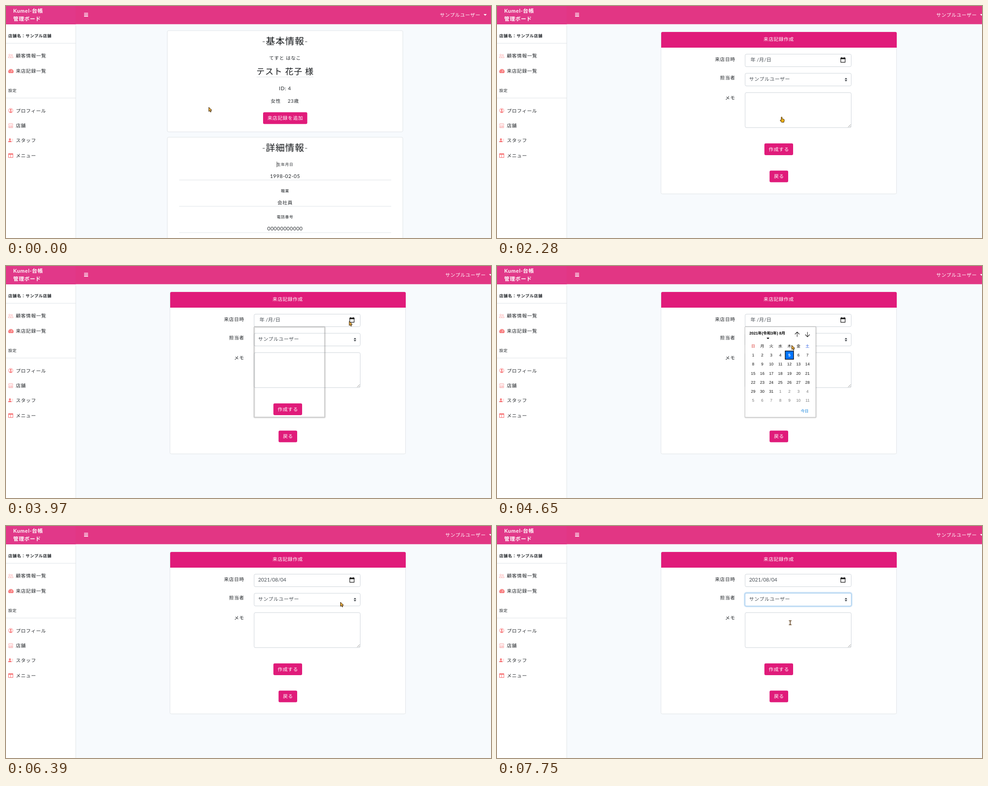
These frames come from a looping animation (1081 px wide and 518 px high, 8 s). An HTML page:

```html
<!DOCTYPE html>
<html lang="ja">
<head>
<meta charset="utf-8">
<title>来店記録</title>
<style>
html, body { margin: 0; width: 100%; height: 100%; overflow: hidden; background: #f7fafd; }
svg { display: block; width: 1081px; height: 518px; }
text { font-family: Lato, 'Noto Sans CJK JP', sans-serif; letter-spacing: .7px; white-space: pre; text-rendering: geometricPrecision; }
.cal text { font-family: 'Liberation Sans', 'Noto Sans CJK JP', sans-serif; letter-spacing: 0; }
.plain { letter-spacing: 0; }
.off { display: none; }
</style>
</head>
<body>
<svg id="stage" viewBox="0 0 1081 518" xmlns="http://www.w3.org/2000/svg"></svg>
<script>
const INK = '#212529', PINK = '#e01b7a', DARK = '#cb1269', CORAL = '#f8787a', LINE = '#dfe3e7', FIELD = '#ced4da';
const LOOP = 8000, STEP = 68;

const text = (s, x, y, { size = 10.6, fill = INK, anchor = 'start', weight = 400, cls = '' } = {}) =>
  `<text x="${x}" y="${y}" font-size="${size}" fill="${fill}" text-anchor="${anchor}" font-weight="${weight}" class="${cls}">${s}</text>`;
const mid = (s, x, y, o = {}) => text(s, x, y, { anchor: 'middle', ...o });
const rect = (x, y, w, h, fill, more = '') => `<rect x="${x}" y="${y}" width="${w}" height="${h}" fill="${fill}" ${more}/>`;
const box = (x, y, w, h, stroke, id = '') => rect(x, y, w, h, '#fff', `rx="3" stroke="${stroke}" ${id && `id="${id}"`}`);
const rule = (x, y, w) => rect(x, y, w, 1, LINE);
const path = (d, fill, stroke = 'none', w = 1) => `<path d="${d}" fill="${fill}" stroke="${stroke}" stroke-width="${w}"/>`;
const group = (id, body, cls = '') => `<g id="${id}" class="${cls}">${body}</g>`;
const button = (label, x, y, w, h, id = '') =>
  rect(x, y, w, h, PINK, `rx="3" ${id && `id="${id}"`}`) + mid(label, x + w / 2 + .3, y + h / 2 + 3.8, { fill: '#fff', size: 10.7 });

function topBar() {
  return rect(0, 0, 1081, 40.6, '#e23684') + rect(0, 0, 155, 41, '#e13889') +
    text('Kumel-台帳', 16, 14.5, { size: 11.7, weight: 700, fill: '#fff' }) +
    text('管理ボード', 16, 32.5, { size: 11.7, weight: 700, fill: '#fff' }) +
    [15.5, 18.8, 22.1].map(y => rect(174, y, 9, 1.6, '#fff', 'rx=".5"')).join('') +
    group('user', text('サンプルユーザー', 967, 23.8, { size: 10.7, fill: '#fff' }) + path('M1064.5 18h7l-3.5 3.8z', '#fff'));
}

function sideBar() {
  const items = [['顧客情報一覧', 115], ['来店記録一覧', 148.7], ['プロフィール', 237.5], ['店舗', 271], ['スタッフ', 304.3], ['メニュー', 337.8]];
  const icons =
    path('M5 115.5q0-3.5 3-3.5t3 3.5zM11 115.5h5q0-3.5-3-3.5-1 0-1.7.7M6.2 109.3a1.8 1.8 0 1 0 3.6 0a1.8 1.8 0 1 0-3.6 0M11.5 109.5a1.5 1.5 0 1 0 3 0a1.5 1.5 0 1 0-3 0', 'none', '#fbaeae', .9) +
    path('M6.2 149.8a5.8 5.8 0 1 1 9.6 0z', CORAL) +
    path('M11 147.5l2.4-4.4M7.5 146h1M8.4 142.9l.6.6M11 141.5v1M14 146h1', 'none', '#fff', 1) +
    `<circle cx="10.5" cy="233.4" r="4.9" fill="none" stroke="${CORAL}" stroke-width=".9"/><circle cx="10.5" cy="232" r="2" fill="${CORAL}"/>` +
    path('M7 236.6q3.5-3.6 7 0q-3.5 3-7 0z', CORAL) +
    path('M6 267v4.8h9v-4.8M5.4 265.2l1.2-2.8h7.8l1.2 2.8q-1.2 2.2-2.6 0q-1.2 2.2-2.5 0q-1.2 2.2-2.5 0q-1.2 2.2-2.6 0zM7.8 271.5v-3h2v3M11.5 268.3h2v1.8h-2z', 'none', '#fa9fa0', .9) +
    `<circle cx="8.7" cy="297.7" r="2.2" fill="${CORAL}"/>` + path('M4.8 304q0-3.6 3.9-3.6t3.9 3.6z', CORAL) +
    path('M12.8 297.5h3M12.8 300h3M13.8 302.5h2', 'none', '#fbaeae', .9) +
    rect(5, 329, 11, 10, CORAL, 'rx="1"') + rect(6.2, 332, 3.8, 5.8, '#fff') + rect(11, 332, 3.8, 5.8, '#fff');
  return rect(0, 40, 155, 478, '#fff') + rect(155, 40, 1, 478, LINE) +
    text('店舗名：サンプル店舗', 5, 70.3, { size: 9, weight: 700 }) + rule(0, 82.7, 155) +
    text('設定', 5, 192, { size: 8.8 }) + rule(0, 205, 155) +
    items.map(([s, y]) => text(s, 22, y)).join('') + icons;
}

function customerPage() {
  const c = 622, num = { size: 11.2 }, small = { size: 8.6 }, head = { size: 20.8, weight: 300, fill: '#15181b' };
  return box(359.5, 55, 525, 226, LINE) + box(359.5, 293, 525, 260, LINE) +
    mid('-基本情報-', c, 85.5, head) +
    mid('てすと はなこ', c, 120.3) + mid('テスト 花子 様', c, 152.5, { ...head, size: 18.7 }) + rule(558.5, 158, 127) +
    mid('ID: 4', c, 188, num) + text('女性', 590, 215.5) + text('23歳', 628, 215.5) +
    rect(571.9, 235.9, 100.7, 28.7, 'none', 'id="ring" rx="4" stroke="#efa3cb" stroke-width="2.4"') +
    button('来店記録を追加', 573, 237.2, 98.5, 26.2, 'add') +
    mid('-詳細情報-', c, 324, head) +
    mid('生年月日', c, 357, small) + mid('1998-02-05', c, 384, num) + rule(386, 388, 472.5) +
    mid('職業', c, 415.5, small) + mid('会社員', c, 442.7) + rule(386, 446.7, 472.5) +
    mid('電話番号', c, 474.3, small) + mid('00000000000', c, 501.3, num) + rule(386, 505.5, 472.5) +
    rect(603.4, 347.5, .9, 12.5, '#333', 'id="caret"');
}

function recordPage() {
  const gray = '#495057', right = { anchor: 'end' };
  return box(365.5, 58, 525, 361.5, LINE) + path('M366 93v-32q0-3 3-3h519q3 0 3 3v32z', PINK) +
    mid('来店記録作成', 628, 78.3, { fill: '#fff' }) +
    text('来店日時', 531, 123.2, right) + text('担当者', 531, 163.7, right) + text('メモ', 531, 209, right) +
    rect(552, 149, 238.5, 30.5, 'none', 'id="glow" rx="4" stroke="#cbe2f6" stroke-width="3.4"') +
    box(553, 107.5, 236.5, 28, FIELD) + box(553, 150.2, 236.5, 28.3, FIELD, 'select') + box(553, 193.4, 236.5, 78.2, FIELD) +
    group('blank', text('年 /月/日', 565, 124.2, { size: 11.2, fill: gray, cls: 'plain' })) +
    group('date', text('2021/08/04', 562, 124.4, { size: 11.3, fill: gray, cls: 'plain' })) +
    path('M766.3 116.3h9.6v9.4h-9.6z', 'none', '#111', 1.2) + rect(765.7, 115.6, 10.8, 3, '#111') +
    rect(767.3, 114.4, 1.6, 2, '#111') + rect(773.3, 114.4, 1.6, 2, '#111') +
    text('サンプルユーザー', 562, 167.2, { size: 10.8, fill: gray }) +
    path('M775 163.4h5.6l-2.8-3.2zM775 165.2h5.6l-2.8 3.2z', '#343a40') +
    path('M782.5 270.5l6-6M786 270.5l2.5-2.5', 'none', '#777', .8) +
    button('作成する', 596, 306.7, 64, 26.3) + button('戻る', 607.5, 367.5, 41.5, 26) +
    group('list', rect(553, 179, 237, 21.5, '#fff', 'stroke="#888"') + rect(553.5, 179.5, 236, 20.5, '#1967d2') +
      text('サンプルユーザー', 562, 193.8, { size: 10.8, fill: '#fff' }));
}

const cellX = i => 571 + i * 20.17;
function dayCell(id, col, fill, stroke) {
  return rect(cellX(col) - 9.3, 189.7, 18.6, 18.6, fill, `id="${id}" stroke="${stroke}" stroke-width="1.4"`);
}

function calendar() {
  let s = rect(553, 136, 157, 201.5, '#fff') +
    text('2021年(令和3年) 8月', 562.5, 152.6, { size: 8.6, weight: 700, fill: '#000' }) + path('M601 160h6l-3 3.6z', '#000') +
    path('M669 158.3v-11M664 152.5l5-5.2 5 5.2M692 147.3v11M687 153l5 5.2 5-5.2', 'none', '#222', 1.1);
  [...'日月火水木金土'].forEach((d, i) => {
    s += mid(d, cellX(i), 182.2, { size: 8.8, fill: i === 0 ? '#d9322c' : i === 6 ? '#1b50e0' : '#111' });
  });
  s += dayCell('hover', 3, '#e5e5e5', 'none') + dayCell('pick4', 3, '#0075ff', '#101010') +
    dayCell('today', 4, '#fff', '#c9c9c9') + dayCell('pick5', 4, '#0075ff', '#101010');
  for (let n = 0; n < 42; n++) {
    const day = n < 31 ? n + 1 : n - 30;
    s += group('day' + (n + 1), mid(day, cellX(n % 7), 202.2 + Math.floor(n / 7) * 20.2, { size: 8.9, fill: n < 31 ? '#111' : '#777' }));
  }
  return s + text('今日', 677, 327, { size: 8.8, fill: '#1583dc' });
}

const cursors =
  group('arrow', path('M0 0v9.6l2.2-2 1.5 3.3 1.7-.8-1.5-3.2h3z', '#e9ac3c', '#35200a', 1)) +
  group('hand', path('M-1.1 .9q1.1-1.6 2.2 0v3.6l3.4.7q1.6.5 1.3 2.2l-.8 4.7h-5.2l-3.2-4.2q-.3-1.6 2.3.1z', '#f6b417', '#3a2200', 1)) +
  group('beam', path('M-3-4.5h6M-3 4.5h6M0-4.5v9', 'none', '#5f3f1c', 1.6));

// soft shadow that falls slightly to the lower right
const shadow = [5, 3, 1.5].map(w =>
  rect(553.3, 136.3, 157.5, 202, 'none', `rx="2" stroke="#000" stroke-opacity=".05" stroke-width="${w}"`)).join('');

document.getElementById('stage').innerHTML =
  rect(0, 0, 1081, 518, '#f7fafd') + sideBar() + topBar() +
  group('customer', customerPage()) + group('record', recordPage()) +
  group('popup', shadow + group('days', calendar(), 'cal') + rect(552.9, 135.8, 157.6, 202, 'none', 'stroke="#aaa" stroke-width=".6"')) +
  group('cursor', cursors);

const $ = id => document.getElementById(id);
const show = (id, on) => $(id).classList.toggle('off', !on);

// start, end, then where the pointer arrives
const moves = [
  [320, 1070, 634.5, 247.5], [2820, 3580, 760, 125], [3650, 3850, 765, 123.5], [4040, 4450, 694, 144],
  [4510, 4650, 657, 177], [4710, 5190, 634, 196], [5600, 6390, 745.5, 170], [6460, 6800, 742, 168],
  [7060, 7400, 700, 186], [7400, 7750, 653.5, 216]
];

function pointer(t) {
  let x = 452, y = 226;
  for (const [a, b, tx, ty] of moves) {
    if (t < a) break;
    const u = Math.min(1, (Math.floor((t - a) / STEP) + 1) / (Math.floor((b - a) / STEP) + 1));
    const e = (1 - Math.cos(Math.PI * u)) / 2;
    x += (tx - x) * e;
    y += (ty - y) * e;
  }
  return [x, y];
}

function render(t) {
  const [x, y] = pointer(t);
  const inside = (l, top, r, bottom) => x > l && x < r && y > top && y < bottom;
  const between = (a, b) => t >= a && t < b;
  const first = t < 2280, popup = between(3970, 5670), picked = t >= 5390, list = between(6600, 7330);
  const onAdd = first && inside(573, 237, 671, 263);

  show('customer', first);
  show('record', !first);
  $('user').setAttribute('transform', `translate(${first ? 0 : 12})`);
  $('add').setAttribute('fill', onAdd ? DARK : PINK);
  show('ring', t >= 1600);
  show('caret', t < 530 || between(1060, 1600));

  show('popup', popup);
  show('days', t >= 4040);
  show('hover', inside(621, 189, 641, 209));
  show('pick4', picked);
  show('today', picked);
  show('pick5', !picked);
  for (const [id, on] of [['day4', picked], ['day5', !picked]]) {
    const label = $(id).firstChild;
    label.setAttribute('fill', on ? '#fff' : '#111');
    label.setAttribute('font-weight', on ? 700 : 400);
  }
  show('blank', t < 5600);
  show('date', t >= 5600);

  show('glow', t >= 6600);
  $('select').setAttribute('stroke', t >= 6600 ? '#a1cbef' : FIELD);
  show('list', list);

  const hand = onAdd || between(2280, 2820);
  const beam = !first && !hand && !popup && !list && inside(553, 193, 790, 272);
  $('cursor').setAttribute('transform', `translate(${x.toFixed(2)} ${y.toFixed(2)})`);
  show('hand', hand);
  show('beam', beam);
  show('arrow', !hand && !beam);
}

const start = performance.now();
function frame() {
  render((performance.now() - start) % LOOP);
  requestAnimationFrame(frame);
}
frame();
</script>
</body>
</html>
```
